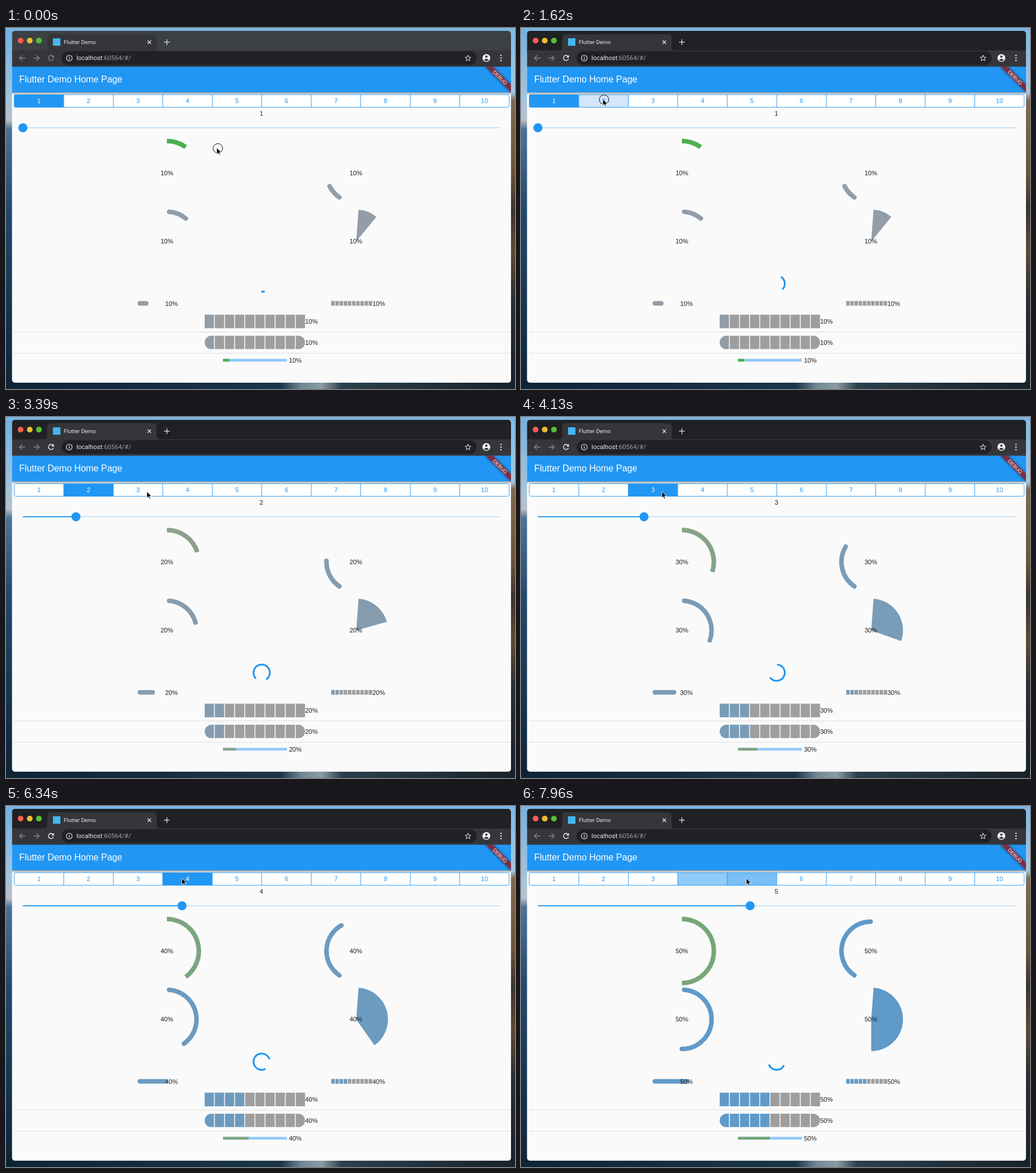
These frames come from a looping animation (889 by 630 pixels, 8000 ms). An HTML page:

```html
<!DOCTYPE html>
<html lang="en">
<head>
<meta charset="utf-8">
<title>Progress widgets</title>
<style>
  html, body { margin: 0; width: 100%; height: 100%; overflow: hidden; background: #16304a; }
  svg { display: block; width: 889px; height: 630px; }
  text { font-family: "Liberation Sans", Arial, sans-serif; font-size: 11.1px; fill: #1c1c1c; }
  .chrome { font-family: Roboto, "Open Sans", sans-serif; fill: #e8eaed; }
  .mid { text-anchor: middle; }
  .line { fill: none; stroke-width: 1.3; }
</style>
</head>
<body>
<svg id="stage" viewBox="0 0 889 630">
  <defs>
    <linearGradient id="sea" x2="0" y2="1">
      <stop offset="0" stop-color="#6fb2e4"/><stop offset=".2" stop-color="#a3c4de"/>
      <stop offset=".255" stop-color="#b9bfc9"/><stop offset=".28" stop-color="#4d7397"/>
      <stop offset=".5" stop-color="#24486b"/><stop offset="1" stop-color="#0d2437"/>
    </linearGradient>
    <linearGradient id="cliff" x2="0" y2="1">
      <stop offset="0" stop-color="#7fbbe7"/><stop offset=".18" stop-color="#a5c5dc"/>
      <stop offset=".2" stop-color="#80694f"/><stop offset=".4" stop-color="#6d5337"/>
      <stop offset=".5" stop-color="#3a3430"/><stop offset=".62" stop-color="#5f4a33"/>
      <stop offset=".75" stop-color="#2a2f33"/><stop offset="1" stop-color="#17222b"/>
    </linearGradient>
    <linearGradient id="shore">
      <stop offset="0" stop-color="#0d2437"/><stop offset=".54" stop-color="#1a3549"/>
      <stop offset=".58" stop-color="#6f8794"/><stop offset=".62" stop-color="#8b9ca3"/>
      <stop offset=".66" stop-color="#2b3f4c"/><stop offset="1" stop-color="#17222b"/>
    </linearGradient>
    <linearGradient id="drop" x2="0" y2="1">
      <stop offset="0" stop-color="#000" stop-opacity=".38"/><stop offset="1" stop-color="#000" stop-opacity="0"/>
    </linearGradient>
    <clipPath id="win"><rect x="10.5" y="5" width="871.5" height="614" rx="5"/></clipPath>
    <clipPath id="page"><rect x="10.5" y="67.5" width="871.5" height="552"/></clipPath>
    <clipPath id="pill"><rect x="347" y="537" width="175.3" height="23.6" rx="11.8"/></clipPath>
    <filter id="soft" x="-20%" y="-80%" width="140%" height="260%"><feGaussianBlur stdDeviation="2"/></filter>
  </defs>

  <rect width="889" height="630" fill="url(#sea)"/>
  <rect x="870" width="19" height="630" fill="url(#cliff)"/>
  <rect width="889" height="5" fill="#78b5e3"/>
  <rect y="616" width="889" height="14" fill="url(#shore)"/>

  <g clip-path="url(#win)">
    <rect x="10" y="5" width="873" height="615" fill="#fafafa"/>
    <rect id="frame" x="10" y="5" width="873" height="35"/>
    <path d="M66 39q6 0 6-6V17q0-6 6-6H257q6 0 6 6V33q0 6 6 6H883V68H10V39z" fill="#35363a"/>
    <circle cx="25.5" cy="22" r="5" fill="#fc5b57"/>
    <circle cx="41.5" cy="22" r="5" fill="#e9bf33"/>
    <circle cx="57.5" cy="22" r="5" fill="#57c038"/>
    <rect x="82" y="18" width="13" height="13" fill="#45b5f0"/>
    <text class="chrome" x="101" y="28" style="font-size:9.7px">Flutter Demo</text>
    <path class="line" stroke="#dfe1e5" d="M247.3 21.8l6 6m0-6l-6 6M276 24.7h10m-5-5v10"/>
    <path class="line" stroke="#85878b" d="M33.5 52.5H23.5m4.7-4.7l-4.7 4.7l4.7 4.7M48 52.5H58m-4.7-4.7l4.7 4.7l-4.7 4.7"/>
    <g id="reload">
      <path class="line" stroke="currentColor" d="M82 49.2A4.5 4.5 0 1 0 83 53.6"/>
      <path fill="currentColor" d="M83.7 47v4.6h-4.6z"/>
    </g>
    <rect x="97" y="40.5" width="725" height="24" rx="12" fill="#202124"/>
    <circle class="line" cx="110.5" cy="52.5" r="5" stroke="#e8eaed" style="stroke-width:1.1"/>
    <path class="line" stroke="#e8eaed" d="M110.5 51.8v3.4m0-5.6v1.2"/>
    <text class="chrome" x="123" y="56.3">localhost<tspan fill="#9aa0a6">:60564/#/</tspan></text>
    <path id="star" class="line" stroke="#e8eaed" style="stroke-width:1"/>
    <circle cx="839" cy="52.3" r="6.8" fill="#f1f3f4"/>
    <circle cx="839" cy="50" r="2" fill="#35363a"/>
    <path d="M834.8 55.7q4.2-4 8.4 0q-4.2 4-8.4 0z" fill="#35363a"/>
    <path d="M864.5 47.8h0m0 4.6h0m0 4.6h0" stroke="#e8eaed" stroke-width="2.5" stroke-linecap="round"/>

    <rect x="10" y="112" width="873" height="5" fill="url(#drop)"/>
    <rect x="10" y="67.5" width="873" height="44.8" fill="#2196f3"/>
    <text x="23" y="95.3" style="font-size:15.9px;fill:#fff">Flutter Demo Home Page</text>
    <g clip-path="url(#page)">
      <g transform="translate(882 67.5) rotate(45)">
        <rect x="-31.7" y="22.2" width="63.4" height="9.5" opacity=".5" filter="url(#soft)"/>
        <rect x="-31.7" y="22.2" width="63.4" height="9.5" fill="#b71c1c" fill-opacity=".63"/>
        <text class="mid" y="30.1" style="font-size:8.9px;fill:#fff">DEBUG</text>
      </g>
    </g>

    <g id="tabs"></g>
    <rect x="14.4" y="116.3" width="864.4" height="22" rx="3" fill="none" stroke="#2196f3" stroke-width=".9"/>

    <text id="count" class="mid" x="446" y="153"></text>
    <rect x="29.5" y="173.4" width="834.5" height="1.6" fill="#2196f3" fill-opacity=".27"/>
    <rect id="track" x="29.5" y="173.2" height="1.8" fill="#2196f3"/>
    <circle id="thumb" cy="174.2" r="7.9" fill="#2196f3"/>

    <path d="M13 530.5H882M13 567.5H882" stroke="#dfdfdf"/>
    <g id="gauges" fill="none" stroke-width="8"></g>
    <g id="labels"></g>
  </g>

  <circle id="ring" r="8.3" fill="none" stroke="#111" stroke-width="1"/>
  <path id="cursor" d="M0 0V11.2L2.6 8.9L4.3 12.8L6.1 12L4.5 8.2H8z" fill="#000" stroke="#fff" stroke-width=".8"/>
</svg>
<script>
const $ = id => document.getElementById(id);
const LOOP = 8000, TICK = 147.4;
const BLUE = [33, 150, 243], GREEN = [76, 175, 80], GREY = [158, 158, 158],
      WHITE = [255, 255, 255], PRESSED = [209, 230, 250];
const PRESSES = [11, 25, 39, 53];          // ticks at which the next tab is held down
const SEG = 86.45;

// cursor tip: tick, x, y
const PATH = [
  [0, 368, 209], [1, 368, 209], [5, 144, 268], [7, 145, 205], [9, 150, 92], [10, 145, 117],
  [11, 143, 124], [13, 146, 125], [15, 195, 125], [16, 246, 131], [17, 246, 130],
  [33, 246, 130], [37, 305, 124.5], [39, 305, 124.5], [41, 307, 126], [49, 307, 126], [52, 393.5, 126]
];

const mix = (a, b, k) => `rgb(${a.map((v, i) => Math.round(v + (b[i] - v) * k))})`;
const clamp = v => Math.min(1, Math.max(0, v));
const rect = (x, y, w, h, fill) =>
  `<rect x="${x}" y="${y}" width="${w}" height="${h}" fill="${fill}" stroke="none"/>`;

// angles in degrees, clockwise from twelve o'clock
function arc(cx, cy, r, from, sweep) {
  const at = d => {
    const a = d * Math.PI / 180;
    return `${(cx + r * Math.sin(a)).toFixed(2)} ${(cy - r * Math.cos(a)).toFixed(2)}`;
  };
  return `M${at(from)}A${r} ${r} 0 ${sweep > 180 ? 1 : 0} 1 ${at(from + sweep)}`;
}

// cubic-bezier(.4, 0, .2, 1)
function ease(x) {
  let lo = 0, hi = 1;
  for (let i = 0; i < 24; i++) {
    const u = (lo + hi) / 2, v = 1 - u;
    if (1.2 * v * v * u + .6 * v * u * u + u * u * u < x) lo = u; else hi = u;
  }
  return lo * lo * (3 - 2 * lo);
}

function spinner(tick) {
  const u = 4.065 + .15 * tick, step = Math.floor(u), f = u - step;
  const head = ease(clamp(f * 2)), tail = ease(clamp(f * 2 - 1));
  const d = arc(446.5, 446.2, 14.2, 270 * tail + 306 * f - 144 * step, Math.max(270 * (head - tail), .1));
  return `<path d="${d}" stroke="${mix(BLUE, BLUE, 0)}" stroke-width="3.1" stroke-linecap="square"/>`;
}

function blocks(x, y, step, w, h, value, color) {
  let s = '';
  for (let i = 0; i < 10; i++) s += rect(x + i * step, y, w, h, i < value ? color : mix(GREY, GREY, 0));
  return s;
}

function tabs(value, held, fade) {
  let s = '';
  for (let n = 1; n <= 10; n++) {
    const x = 14.4 + SEG * (n - 1);
    let bg = mix(WHITE, WHITE, 0), ink = mix(BLUE, BLUE, 0);
    if (n === value) {
      bg = fade ? mix(PRESSED, BLUE, .5) : ink;
      ink = mix(BLUE, WHITE, fade ? .5 : 1);
    } else if (fade && n === value - 1) {
      bg = ink = mix(BLUE, WHITE, .5);
    } else if (held && n === value + 1) {
      bg = mix(PRESSED, PRESSED, 0);
    }
    s += rect(x, 116.3, SEG, 22, bg);
    if (n > 1) s += rect(x - .4, 116.3, .9, 22, mix(BLUE, BLUE, 0));
    s += `<text class="mid" x="${x + SEG / 2}" y="131.2" style="fill:${ink}">${n}</text>`;
  }
  return s;
}

function gauges(value, tick) {
  const p = value / 10, blue = mix(GREY, BLUE, p);
  const green = value === 1 ? mix(GREEN, GREEN, 0) : mix(GREY, GREEN, p);
  const round = d => `<path d="${d}" stroke="${blue}" stroke-linecap="round"/>`;
  return `<path d="${arc(281, 253, 55.8, 0, 360 * p)}" stroke="${green}"/>`
    + round(arc(611, 253, 51.3, 214.1, 291 * p))
    + round(arc(281, 372.3, 51.8, 4.4, 351.2 * p))
    + `<path d="${arc(611.7, 372.4, 55.5, 4.2, 351.6 * p)}L611.7 372.4z" fill="${blue}"/>`
    + spinner(tick)
    + round(`M233.8 480.5h${11.15 * value}`)
    + blocks(568, 476.4, 7.27, 6.1, 8.2, value, blue)
    + blocks(347, 500.3, 17.68, 16.2, 23.7, value, blue)
    + `<g clip-path="url(#pill)">${blocks(347, 537, 17.68, 16.2, 23.6, value, blue)}</g>`
    + rect(379, 577.4, 111.6, 4.8, '#90caf9')
    + rect(379, 577.4, 111.6 * p, 4.8, green);
}

const SPOTS = [[281, 257], [611, 257], [281, 376.3], [611, 376.3], [289, 484.5],
               [651, 484.5], [533.5, 516.3], [533.5, 552.9], [505.3, 584]];
const labels = value => SPOTS.map(([x, y]) => `<text class="mid" x="${x}" y="${y}">${value}0%</text>`).join('');

function tip(tick) {
  let i = 0;
  while (i < PATH.length - 2 && tick > PATH[i + 1][0]) i++;
  const [t0, x0, y0] = PATH[i], [t1, x1, y1] = PATH[i + 1];
  const k = clamp((tick - t0) / (t1 - t0));
  return [x0 + (x1 - x0) * k, y0 + (y1 - y0) * k];
}

function draw(ms) {
  const tick = Math.floor((ms % LOOP + 7.5) / TICK);
  const value = 1 + PRESSES.filter(t => tick > t).length;
  const held = PRESSES.includes(tick), fade = PRESSES.includes(tick - 1);
  const [x, y] = tip(tick), thumb = 29.5 + 92.65 * (value - 1);

  $('frame').setAttribute('fill', tick ? '#202124' : '#3c4043');
  $('reload').setAttribute('color', tick ? '#f1f3f4' : '#85878b');
  $('tabs').innerHTML = tabs(value, held, fade);
  $('count').textContent = value;
  $('track').setAttribute('width', thumb - 29.5);
  $('thumb').setAttribute('cx', thumb);
  $('gauges').innerHTML = gauges(value, tick);
  $('labels').innerHTML = labels(value);
  $('cursor').setAttribute('transform', `translate(${x} ${y})`);
  $('ring').setAttribute('transform', `translate(${x + 2} ${y + 1})`);
  $('ring').setAttribute('visibility', held || !tick ? 'visible' : 'hidden');
}

$('star').setAttribute('d', 'M' + Array.from({ length: 10 }, (_, i) => {
  const r = i % 2 ? 2.3 : 5.4, a = i * Math.PI / 5;
  return `${807 + r * Math.sin(a)} ${52.8 - r * Math.cos(a)}`;
}).join('L') + 'z');

const start = performance.now();
function loop() {
  draw(performance.now() - start);
  requestAnimationFrame(loop);
}
loop();
</script>
</body>
</html>
```
